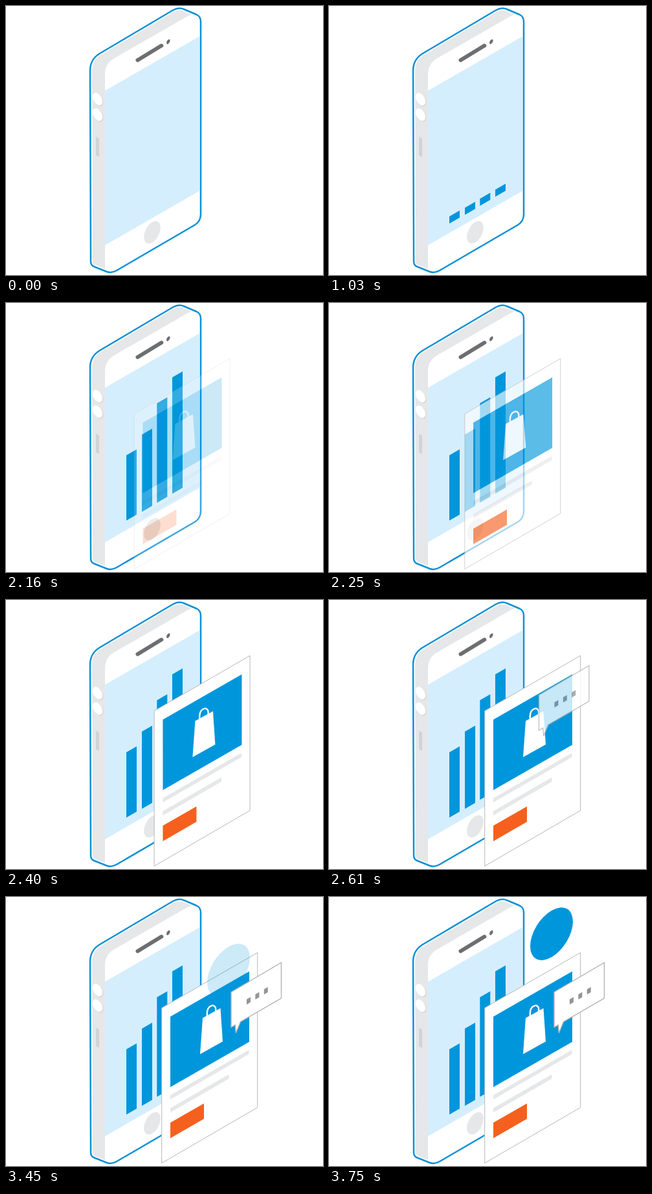
An HTML page that plays this animation: 490 by 416 pixels, repeating every 6.62 s.

```html
<!DOCTYPE html>
<html lang="en">
<head>
<meta charset="utf-8">
<title>Phone shop</title>
<style>
  html, body { margin: 0; width: 100%; height: 100%; overflow: hidden; background: #fff; }
  svg { display: block; width: 490px; height: 416px; }
</style>
</head>
<body>
<svg viewBox="0 0 490 416">
  <defs>
    <path id="body" d="M258 6.5Q267 1.5 275 5L295 13.5Q301 16.5 301 24V322Q301 333 292 338.5L171 409Q163 413.5 156 411L136 403Q131 401 131 395L130 100Q130 83 144 74Z"/>
    <g id="key">
      <circle r="8" transform="matrix(1 .5 0 1.15 .9 .9)" fill="#d1d3d4"/>
      <circle r="7.8" transform="matrix(1 .5 0 1.15 0 0)" fill="#fff"/>
    </g>
  </defs>

  <g id="phone">
    <use href="#body" fill="#e6e7e8" stroke="#fff" stroke-width="6"/>
    <path fill="#fff" d="M153 410V106Q153 89 167 81L281 15.5Q292 10 297.5 15.5Q300 18 300 24V322Q300 332 292 337.5L171 408Q162 413 153 410Z"/>
    <path fill="#d5eefd" d="M153 131L299 47V286L153 370Z"/>
    <use href="#body" fill="none" stroke="#0d90d6" stroke-width="2.5"/>
    <path d="M203.5 83.7L240.3 61.3" stroke="#6d6e71" stroke-width="6" stroke-linecap="round"/>
    <circle r="2.8" transform="matrix(1 -.577 0 1.15 250.8 55.2)" fill="#6d6e71"/>
    <circle r="12.8" transform="matrix(1 -.577 0 1.23 226 350)" fill="#e6e7e8"/>
    <use href="#key" x="141.5" y="144"/>
    <use href="#key" x="141.5" y="168"/>
    <path fill="#d1d3d4" d="M139 202L144 205V233.5L139 231Z"/>
  </g>

  <path id="bars" fill="#0096dc"/>

  <g id="card">
    <path fill="#fff" stroke="#b5b7b9" d="M240.7 171.5L388.7 86V325.5L240.7 411.5Z"/>
    <path fill="#0096dc" d="M254 185L376 115V224L254 294Z"/>
    <path fill="#fff" d="M304 187L331.5 172L335 223.5L300 243Z"/>
    <path fill="none" stroke="#fff" stroke-width="2.4" d="M310.8 185V180C311 167 323.500 164 324.200 173V178"/>
    <path fill="#e6e7e8" d="M254 306.500L375.500 236.500V243L254 313ZM254 326.500L344.500 274.300V281L254 333.200Z"/>
    <path fill="#f6601e" d="M254 349L306 319.300V343L254 373Z"/>
  </g>

  <circle id="badge" r="33" fill="#0096dc"/>

  <g id="bubble">
    <path fill="#fff" stroke="#b1b3b5" stroke-width="1.4" d="M348 147L425.500 101.500V156.500L362.500 193L355.300 210.500L354.300 198L348 201.500Z"/>
    <path id="dots" fill="#939598"/>
  </g>
</svg>
<script>
  const LOOP = 6620, STEP = 30, SLOPE = 0.577;
  const $ = id => document.getElementById(id);
  const mix = (a, b, p) => a + (b - a) * p;

  // Left edge, bottom and full height of each bar
  const BARS = [[186, 336.5, 101], [210, 323, 119.5], [233.3, 309, 154], [257, 295, 180]];
  const BAR_W = 16, BAR_MIN = 11, PEAK = 1.28;

  function slab(x, bottom, w, h) {
    const rise = w * SLOPE;
    return `M${x} ${bottom}v${-h}l${w} ${-rise}v${h}Z`;
  }

  // Stepped progress; negative before the start
  function progress(t, start, length) {
    if (t < start) return -1;
    return Math.min(1, Math.floor((t - start) / STEP) * STEP / length);
  }

  // Shoots past the full height, then settles
  function spring(p) {
    const turn = 0.6;
    if (p < turn) return PEAK * Math.sin(p / turn * Math.PI / 2);
    return mix(PEAK, 1, (p - turn) / (1 - turn));
  }

  function show(el, p, transform, opacity) {
    el.style.display = p < 0 ? "none" : "";
    el.setAttribute("transform", transform);
    el.setAttribute("opacity", opacity);
  }

  function slide(el, p, from) {
    show(el, p, `translate(${mix(-from, 0, p)} 0)`, Math.min(1, mix(0.2, 1, p * 2)));
  }

  function draw(t) {
    const grow = progress(t, 1030, 270);
    $("bars").setAttribute("d", grow < 0 ? "" : BARS.map(([x, y, h]) =>
      slab(x, y, BAR_W, mix(BAR_MIN, h, spring(grow)))).join(""));

    slide($("card"), progress(t, 2160, 330), 42.5);
    slide($("bubble"), progress(t, 2490, 330), 37);

    const rise = progress(t, 3450, 300);
    show($("badge"), rise, `matrix(1 ${-SLOPE} 0 1.09 344 ${mix(113, 57, rise)})`, mix(0.2, 1, rise));
  }

  $("dots").setAttribute("d", [0, 1, 2].map(i =>
    slab(372 + i * 13.4, 166.2 - i * 7.7, 6, 8)).join(""));

  const begin = performance.now();
  function tick() {
    draw((performance.now() - begin) % LOOP);
    requestAnimationFrame(tick);
  }
  tick();
</script>
</body>
</html>
```
